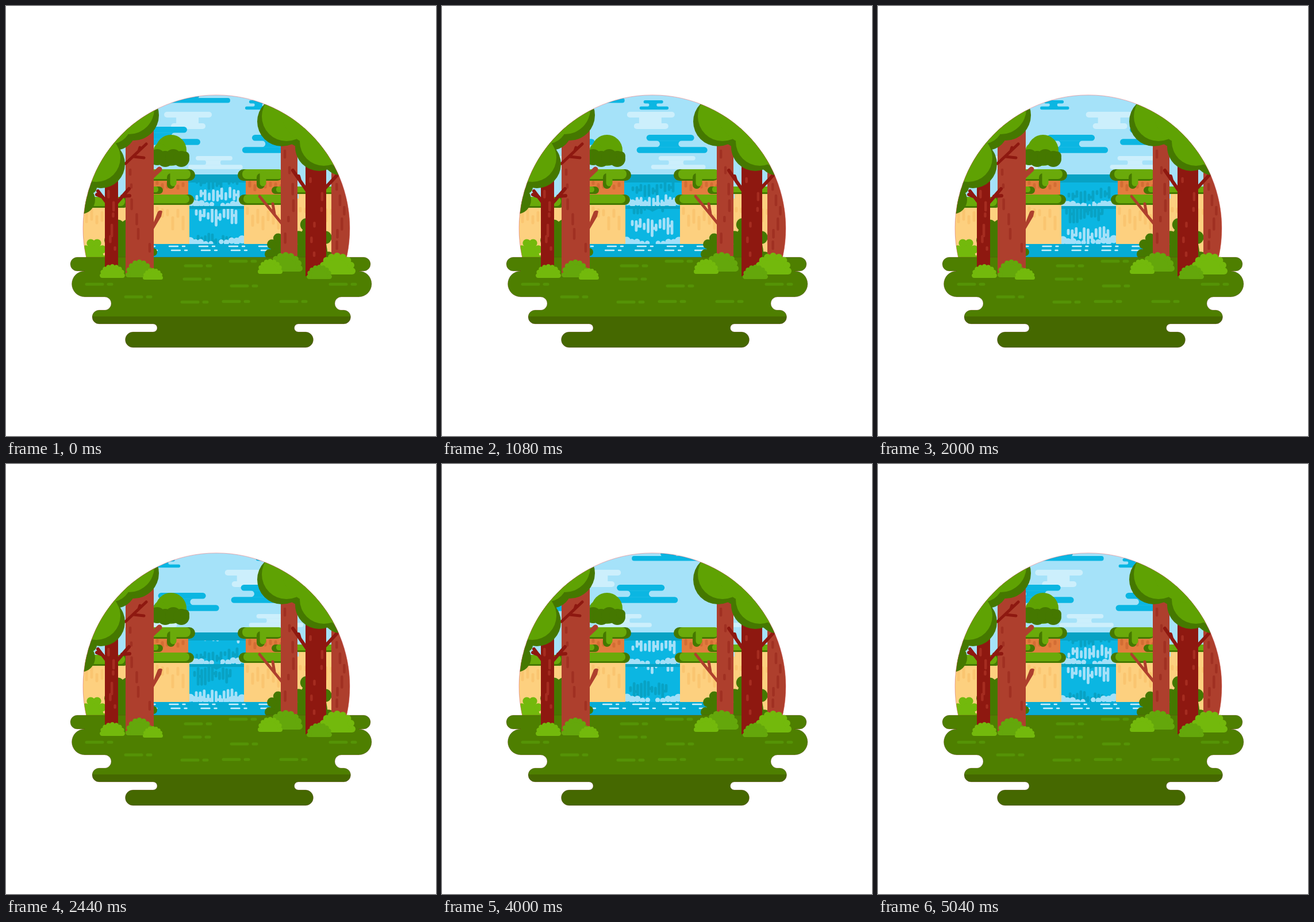
Write an HTML page that moves like this. It is 748 px wide and 748 px high and loops after 5.08 s.

```html
<!DOCTYPE html>
<html lang="en">
<head>
<meta charset="utf-8">
<title>Forest waterfall</title>
<style>
html, body { margin: 0; width: 100%; height: 100%; overflow: hidden; background: #fff; }
svg { display: block; width: 100vw; height: 100vh; }
</style>
</head>
<body>
<svg id="stage" viewBox="0 0 748 748"></svg>
<script>
const LOOP = 5080;
const C = {
  sky: '#a5e2f9', pale: '#cceffc', blue: '#0bb6e2', deep: '#08a2c4', pond: '#06acd5', foam: '#a4e0f8',
  sand: '#fdd07f', sandDark: '#fac570', rock: '#e27d3e', rockDark: '#d36d34',
  leaf: '#5fa203', leafDark: '#457800', moss: '#6aaa0a', bush: '#73b90c', bushDark: '#64a70b',
  grass: '#4e7f00', grassLow: '#456800', blade: '#559306',
  bark: '#ae3f2d', barkMark: '#a03022', wood: '#8e1810', woodMark: '#a52c20'
};

const rect = (x, y, w, h, fill, r = 0) =>
  `<rect x="${x}" y="${y}" width="${w}" height="${h}" rx="${r}" fill="${fill}"/>`;
const dot = (x, y, r, fill) => `<circle cx="${x}" cy="${y}" r="${r}" fill="${fill}"/>`;
const path = (d, fill) => `<path d="${d}" fill="${fill}"/>`;
const lines = (d, color, w) =>
  `<path d="${d}" fill="none" stroke="${color}" stroke-width="${w}" stroke-linecap="round" stroke-linejoin="round"/>`;
const clip = (id, shape) => `<clipPath id="${id}">${shape}</clipPath>`;
const inside = (id, body) => `<g clip-path="url(#${id})">${body}</g>`;
const group = (id, body) => `<g id="${id}">${body}</g>`;
const tile = (dx, dy, body) =>
  [-1, 0, 1].map(k => `<g transform="translate(${k * dx} ${k * dy})">${body}</g>`).join('');
const loop = (n, f) => Array.from({ length: n }, (_, i) => f(i)).join('');

function seeded(s) {
  return (lo, hi) => {
    s = (s * 16807) % 2147483647;
    return lo + (hi - lo) * s / 2147483647;
  };
}

// Two bars joined by a waist with scooped ends, k scales the width
function cloud(x, y, h, color, k = 1) {
  const r = h / 2, a = x + 23 * k, b = x + 56 * k;
  return rect(x, y, 83 * k, h, color, r) +
    path(`M${a - r} ${y + h - .3}H${b + r}a${r} ${r} 0 0 0 0 ${h + .6}H${a - r}a${r} ${r} 0 0 0 0 ${-h - .6}z`, color) +
    rect(x - 17 * k, y + 2 * h, 123 * k, h, color, r);
}

// Flat-based half-ellipse with n bumps along its rim
function shrub(x1, x2, base, h, color, n = 9) {
  const cx = (x1 + x2) / 2, w = (x2 - x1) / 2, r = w * 1.7 / n;
  return path(`M${x1 + r} ${base}A${w - r} ${h - r} 0 0 1 ${x2 - r} ${base}z`, color) +
    loop(n, i => {
      const a = Math.PI * i / (n - 1);
      return dot(cx - (w - r) * Math.cos(a), base - r - (h - 2 * r) * Math.sin(a), r, color);
    });
}

// Mossy slab; its shaded end faces the falls
function ledge(x1, x2, y, h, shadeRight) {
  const x = shadeRight ? x1 : x1 + 8;
  return rect(x1, y, x2 - x1, h, C.leafDark, h / 2) + rect(x, y, x2 - x1 - 8, h - 3, C.moss, h / 2 - 2);
}

function drips(x1, x2, y, h, color) {
  const rnd = seeded(x1 * 31 + h);
  let d = '';
  for (let x = x1; x < x2; x += 9) d += `M${x} ${y + rnd(0, h * .4)}v${rnd(.1, .5) * h}`;
  return lines(d, color, 5);
}

function marks(x1, x2, y1, y2, color) {
  const rnd = seeded(x1 * 17 + y1), n = 6;
  return lines(loop(n, i => `M${rnd(x1, x2)} ${y1 + (y2 - y1) * i / n}v${rnd(3, 22)}`), color, 4.5);
}

function streaks(seed, x1, x2, mid, len, color) {
  const rnd = seeded(seed), n = 11, step = (x2 - x1) / (n - 1);
  return lines(loop(n, i => {
    const l = rnd(.2, 1) * len;
    return `M${x1 + i * step} ${mid - l / 2 + rnd(-5, 5)}v${l}` + (i % 4 === 1 ? `m0 ${-l / 2}h${step}` : '');
  }), color, 4.8);
}

function splash(id, x, base, dir) {
  return group(id, loop(5, i => dot(x + dir * i * 9, base - (i % 2 ? 2 : 4) + i, 7 - i * .7, C.foam)));
}

function sky() {
  const dark = cloud(428, 224, 10.6, C.blue) + cloud(572, 210, 10.6, C.blue) +
    cloud(423, 164, 5.4, C.blue, .41) +
    rect(598, 160, 132, 8.5, C.blue, 4) + rect(648, 150, 28, 10.5, C.blue, 4);
  const pale = rect(275, 184, 83, 10, C.pale, 5) + rect(296, 193, 39, 12, C.pale) +
    rect(287, 204, 60, 10, C.pale, 5) + cloud(330, 261, 7.6, C.pale, .77);
  return rect(134, 155, 464, 290, C.sky) + group('pale', tile(220, 0, pale)) +
    group('dark', tile(340, 0, dark));
}

function falls() {
  const upper = streaks(7, 332, 404, 329, 20, C.foam) + streaks(19, 332, 402, 305, 18, C.deep);
  const lower = streaks(23, 331, 400, 364, 30, C.foam) + streaks(41, 328, 390, 325, 28, C.deep);
  return rect(316, 293, 102, 122, C.blue) +
    inside('upper', group('upFall', tile(0, 61, upper)) +
      splash('splashL', 322, 345, 1) + splash('splashR', 412, 345, -1)) +
    rect(316, 293, 102, 14, C.deep) +
    path('M318 348H414V353H376L366 358L358 353H318z', C.deep) +
    inside('lower', group('lowFall', tile(0, 86, lower)) +
      splash('foamL', 321, 412, 1) + splash('foamR', 411, 411, -1));
}

function cliffs() {
  return rect(134, 343, 185, 100, C.sand) + rect(414, 335, 184, 105, C.sand) +
    rect(509, 322, 60, 20, C.sand) +
    rect(250, 300, 67, 32, C.rock) + rect(417, 300, 64, 32, C.rock) +
    drips(263, 316, 306, 20, C.rockDark) + drips(424, 480, 306, 20, C.rockDark) +
    drips(140, 172, 353, 46, C.sandDark) + drips(263, 316, 350, 50, C.sandDark) +
    drips(420, 478, 350, 50, C.sandDark) + drips(512, 568, 350, 40, C.sandDark) +
    ledge(230, 273, 314, 13, true) + ledge(462, 585, 314, 13, false) +
    ledge(130, 215, 332, 19, true) + ledge(230, 327, 328, 18, true) + ledge(405, 490, 328, 18, false) +
    ledge(230, 329, 284, 20, true) + ledge(403, 482, 284, 20, false) +
    lines('M287 298V311M443 298V311', C.leafDark, 14) +
    lines('M291 291V308M447 291V308', C.moss, 11);
}

function pond() {
  const row = (id, x, y) => group(id, lines(
    loop(5, i => `M${x + i * 52} ${y}h15m8 0h4`), C.pale, 2.4));
  return rect(250, 414, 215, 24, C.pond) + row('rippleA', 232, 418) + row('rippleB', 236, 425);
}

function backdrop() {
  return dot(256, 428, 7, C.leafDark) + shrub(450, 510, 440, 46, C.leafDark, 6) +
    shrub(166, 240, 460, 92, C.leafDark, 6) + shrub(492, 572, 450, 84, C.leafDark, 6) +
    shrub(128, 178, 448, 44, C.bush, 6);
}

function ground() {
  const d = 'M124 437H622a12 12 0 0 1 0 24H613.5a22.5 22.5 0 0 1 0 45H583.5a11.5 11.5 0 0 0 0 23' +
    'H587.5a12 12 0 0 1 0 24H508.5a7 7 0 0 0 0 14H521a13.5 13.5 0 0 1 0 27H221a13.5 13.5 0 0 1 0-27' +
    'H256a7 7 0 0 0 0-14H162a12 12 0 0 1 0-24H171.5a11.5 11.5 0 0 0 0-23H137' +
    'a22.5 22.5 0 0 1 0-45H124a12 12 0 0 1 0-24z';
  const tufts = [[312, 452], [390, 444], [310, 475], [140, 484], [392, 487],
    [208, 506], [306, 515], [378, 514], [478, 514], [564, 484]];
  return clip('land', `<path d="${d}"/>`) +
    inside('land', rect(100, 437, 548, 103, C.grass) + rect(100, 540, 548, 56, C.grassLow)) +
    lines(tufts.map(([x, y]) => `M${x} ${y}h28m10 0h6`).join(''), C.blade, 5) +
    `<path d="${d}" fill="none" stroke="#6b2a20" stroke-width=".7" opacity=".4"/>`;
}

function smallTree() {
  return lines('M250 300L267 284', C.bark, 9) +
    dot(287, 251, 27, C.leaf) + dot(268, 250, 11, C.leaf) +
    loop(4, i => dot(263 + i * 14, 263 + (i % 2) * 3, 14, C.leafDark)) + dot(311, 261, 8, C.leafDark);
}

// Dark lobes with the same lobes in light, shifted and clipped by the dark ones
function crown(id, lobes, dx, dy) {
  const all = color => lobes.map(([x, y, r]) => dot(x, y, r, color)).join('');
  return clip(id, all(C.leaf)) + all(C.leafDark) +
    inside(id, `<g transform="translate(${dx} ${dy})">${all(C.leaf)}</g>`);
}

function leftTrees() {
  return path('M208 205H257V376L264 358Q267 354 272 357L270 366L257 388V470H208z', C.bark) +
    lines('M244 240L208 274M222 262L240 264M231 252L233 246', C.wood, 5) +
    marks(215, 250, 285, 440, C.barkMark) +
    path('M172 300H195V458H172z', C.wood) +
    lines('M193 342L214 318M202 331L215 330M176 343L160 322M168 332L158 328', C.wood, 6) +
    marks(178, 190, 322, 440, C.woodMark) +
    dot(130, 337, 25, C.leafDark) + dot(146, 315, 12, C.leafDark) +
    crown('crownL', [[222, 190, 44], [190, 215, 36], [165, 275, 42], [140, 240, 55]], -8, -11);
}

function rightTrees() {
  return rect(566, 270, 34, 168, C.bark) + marks(574, 590, 310, 430, C.barkMark) +
    rect(478, 235, 29, 200, C.bark) +
    lines('M481 380L441 331M467 362L464 344', C.bark, 5) + marks(484, 501, 252, 425, C.barkMark) +
    rect(521, 275, 36, 195, C.wood) +
    lines('M524 322L499 286M511 303L509 296M554 318L580 290', C.wood, 6) +
    marks(528, 550, 300, 455, C.woodMark) +
    crown('crownR', [[480, 201, 43], [545, 245, 42], [585, 258, 37], [530, 190, 60]], 8, -9);
}

function shrubs() {
  return shrub(163, 207, 473, 24, C.bush) + shrub(208, 256, 472, 31, C.bushDark) +
    shrub(238, 273, 476, 20, C.bush) + shrub(457, 516, 462, 34, C.bushDark) +
    shrub(438, 481, 466, 26, C.bush) + shrub(544, 608, 467, 38, C.bush) +
    shrub(523, 567, 475, 25, C.bushDark);
}

document.getElementById('stage').innerHTML =
  clip('dome', dot(366, 387, 232, '#000')) + clip('upper', rect(316, 293, 102, 55, '#000')) +
  clip('lower', rect(318, 353, 96, 61, '#000')) +
  inside('dome', sky() + falls() + cliffs() + pond() + backdrop() + smallTree()) +
  ground() +
  inside('dome', leftTrees() + rightTrees()) +
  '<path d="M139.5 437A232 232 0 1 1 592.5 437" fill="none" stroke="#e05a62" stroke-width=".8" opacity=".6"/>' +
  shrubs();

const parts = {};
for (const g of document.querySelectorAll('g[id]')) parts[g.id] = g;
const move = (id, x, y) => parts[id].setAttribute('transform', `translate(${x.toFixed(2)} ${y.toFixed(2)})`);

function draw(ms) {
  const p = (ms % LOOP) / LOOP, wave = (n, o = 0) => Math.sin(2 * Math.PI * (n * p + o));
  move('pale', 220 * p, 0);
  move('dark', -340 * p, 0);
  move('upFall', 0, 61 * p);
  move('lowFall', 0, 86 * p);
  ['splashL', 'splashR', 'foamL', 'foamR'].forEach((id, i) => move(id, wave(2, i * .3), 1.5 * wave(3, i * .2)));
  move('rippleA', 4 * wave(1), 0);
  move('rippleB', -4 * wave(1), 0);
}

function tick() {
  draw(performance.now());
  requestAnimationFrame(tick);
}
tick();
</script>
</body>
</html>
```
